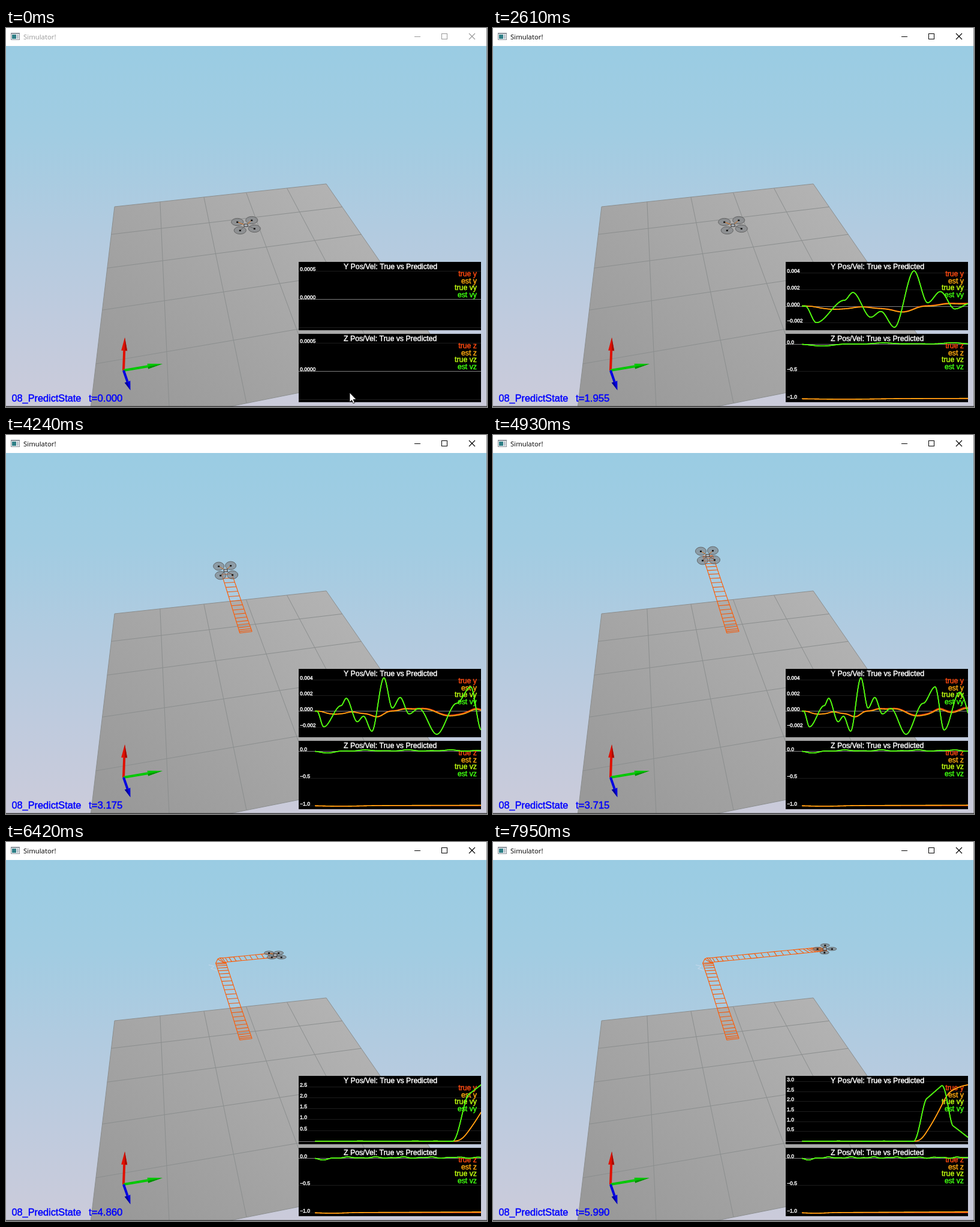
These frames come from a looping animation (802x632 px, 8 s). An HTML page with a canvas:

```html
<!DOCTYPE html>
<html lang="en">
<head>
<meta charset="utf-8">
<title>Simulator</title>
<style>
  html, body { margin: 0; width: 100%; height: 100%; overflow: hidden; background: #fff; }
  canvas { display: block; }
</style>
</head>
<body>
<canvas id="stage" width="802" height="632"></canvas>
<script>
const ctx = document.getElementById('stage').getContext('2d');
const LOOP = 8000, DT = 0.005, T_END = 6;

// ---- helpers ----
const linearEase = f => f;
const cubicEase = f => f * f * (3 - 2 * f);
const mix = (a, b, f) => a + (b - a) * f;
const mixAll = (a, b, f) => a.map((v, i) => mix(v, b[i], f));
const bump = (t, mid, width) => Math.exp(-(((t - mid) / width) ** 2));
const smooth = (from, to, t) => cubicEase(Math.min(1, Math.max(0, (t - from) / (to - from))));

function interpolate(keys, x, ease) {
  let i = 1;
  while (i < keys.length - 1 && keys[i][0] < x) i++;
  const [x0, v0] = keys[i - 1], [x1, v1] = keys[i];
  return mix(v0, v1, ease(Math.min(1, Math.max(0, (x - x0) / (x1 - x0)))));
}

function line(color, width, ...pts) {
  ctx.strokeStyle = color;
  ctx.lineWidth = width;
  ctx.beginPath();
  pts.forEach(p => ctx.lineTo(p[0], p[1]));
  ctx.stroke();
}

function shape(fill, ...pts) {
  ctx.fillStyle = fill;
  ctx.beginPath();
  pts.forEach(p => ctx.lineTo(p[0], p[1]));
  ctx.fill();
}

function rect(fill, x, y, w, h) {
  ctx.fillStyle = fill;
  ctx.fillRect(x, y, w, h);
}

// Plotter-style lettering, slightly thickened
function label(str, x, y, size, color, align = 'left') {
  ctx.font = `${size}px "Liberation Sans", Arial, sans-serif`;
  ctx.fillStyle = ctx.strokeStyle = color;
  ctx.lineWidth = .45;
  ctx.textAlign = align;
  ctx.fillText(str, x, y);
  ctx.strokeText(str, x, y);
}

function linear(x0, y0, x1, y1, ...colors) {
  const g = ctx.createLinearGradient(x0, y0, x1, y1);
  colors.forEach((c, i) => g.addColorStop(i / (colors.length - 1), c));
  return g;
}

// ---- signals ----
// Turning points of the hover drift, in mm/s
const drift = [[.04, 0], [.17, -2], [.5, .7], [.6, 1.64], [.81, -1.35], [.93, -.65], [1.09, -2.56],
  [1.32, 4.25], [1.48, .4], [1.63, 1.75], [1.8, -.35], [1.99, .35], [2.33, -2.95], [2.71, 1],
  [2.98, 3.1], [3.18, -2.4]];

function velY(t) {
  const hover = t < 3.18 ? interpolate(drift, t, cubicEase)
    : -2.4 * Math.cos(9 * (t - 3.18)) - 6 * bump(t, 4.01, .05);
  const cruise = smooth(4.03, 4.5, t) * (2.2 + 1.2 * (t - 4.55));
  const settle = .18 + 1.07 * (6 - t);
  return hover / 1000 + mix(cruise, settle, smooth(5.03, 5.45, t));
}
const velZ = t => -.04 * bump(t, .24, .18)
  + (1 - Math.exp(-3 * t * t)) * (.007 + .008 * Math.sin(8 * t) + .005 * Math.sin(15 * t));
const posZ = t => -1 - .012 * bump(t, .5, .5);

const sample = fn => Array.from({ length: T_END / DT + 1 }, (_, i) => fn(i * DT));
let travelled = 0;
const velYData = sample(velY), velZData = sample(velZ), posZData = sample(posZ);
const posYData = velYData.map(v => travelled += v * DT);
const posY = t => posYData[Math.round(t / DT)];

const RED = '#ff4a10', ORANGE = '#ffaa10', LIME = '#c0ff10', GREEN = '#40ff10';
const colors = [RED, ORANGE, LIME, GREEN];
const plots = [
  { axis: 'y', top: 390, title: 'Y Pos/Vel: True vs Predicted',
    series: [posYData.map((v, i) => v + 4e-5 * i * DT), posYData, velYData, velYData] },
  { axis: 'z', top: 510, title: 'Z Pos/Vel: True vs Predicted',
    series: [posZData, posZData.map((v, i) => v + .003 * Math.max(0, i * DT - 1)), velZData, velZData] }
];

function drawPlot({ axis, top, title, series }, t) {
  const left = 488, right = 792, bottom = top + 114, x0 = 515;
  const shown = series.map(data => data.slice(0, Math.round(t / DT) + 1));
  let lo = -.0005, hi = .0005;
  if (t > 0) {
    lo = Math.min(...shown.flat());
    hi = Math.max(...shown.flat(), lo + 1e-5);
  }
  const unit = 94 / (hi - lo);
  const toY = v => top + 109 - (v - lo) * unit;

  ctx.save();
  ctx.beginPath();
  ctx.rect(left, top, right - left, 114);
  ctx.clip();
  rect('#000', left, top, right - left, 114);

  const decade = 10 ** Math.floor(Math.log10(hi - lo) + 1e-9);
  const lead = (hi - lo) / decade;
  const step = decade * (lead < 3 ? .5 : lead < 6 ? 1 : 2);
  const digits = Math.max(0, -Math.floor(Math.log10(step) + 1e-9));
  const ticks = [];
  for (let i = Math.ceil((lo - 5 / unit) / step); i * step < hi + 15 / unit; i++) ticks.push(i);
  for (const i of ticks) {
    const y = Math.round(toY(i * step)) + .5;
    line(i ? '#1c1c1c' : '#808080', 1, [left, y], [right, y]);
  }

  ['true ', 'est ', 'true v', 'est v'].forEach((name, i) =>
    label(name + axis, 785, top + 24 + i * 11.7, 12.3, colors[i], 'right'));

  if (t > 0) {
    ctx.lineJoin = 'round';
    shown.forEach((data, s) =>
      line(colors[s], 1.6, ...data.map((v, i) => [x0 + (right - x0) * i * DT / t, toY(v)])));
  }
  for (const i of ticks) {
    const y = toY(i * step);
    if (y < bottom - 5.9 && y > top + 4)
      label((i * step).toFixed(digits).replace('-', '−'), 490, y, 8.6, '#fff');
  }
  label(title, 563, top + 12, 12.3, '#fff');
  ctx.restore();
}

// ---- scene ----
function floorPoint(u, v) {
  const w = 1 + .0191 * u - .0897 * v;
  return [(80.8 * u - 21.22 * v + 181) / w, (-2.64 * u + 15.25 * v + 298) / w];
}

function drawFloor() {
  shape(linear(200, 630, 540, 260, '#999', '#b3b3b3'),
    floorPoint(0, 0), floorPoint(5, 0), floorPoint(5, 5), floorPoint(0, 5));
  for (let i = 0; i <= 5; i++) {
    line('#8b8e8e', 1, floorPoint(i, 0), floorPoint(i, 5));
    line('#8b8e8e', 1, floorPoint(0, i), floorPoint(5, i));
  }
}

function arrow(color, shade, x, y, head, half) {
  const ox = 196, oy = 571, len = Math.hypot(x - ox, y - oy);
  const dx = (x - ox) / len, dy = (y - oy) / len;
  const at = (along, side) => [ox + dx * along - dy * side, oy + dy * along + dx * side];
  line(color, 4, at(0, 0), at(len - head, 0));
  shape(color, at(len, 0), at(len - head, half), at(len - head, -half));
  shape(shade, at(len, 0), at(len - head, half), at(len - head, half * .2));
}

// Climb, then slide sideways with the lateral position
function dronePos(t) {
  const climb = smooth(2.1, 3.6, t), side = t < 4 ? 0 : posY(t);
  return [400 - 42 * climb + 69 * side, 329 - 128 * climb - 3.5 * smooth(4.03, 4.2, t) - 6.8 * side];
}

// Screen vectors of the drone's right and front axes, as [rx, ry, fx, fy]
const GROUND = [12, -1.5, 2.3, 7], HOVER = [10, -.5, 1.5, 7.7];
const CRUISE = [8, 0, 2.3, 3.5], BRAKED = [6.3, -3, 5.8, 3];
function dronePose(t) {
  let axes = mixAll(GROUND, HOVER, smooth(2.1, 3.2, t));
  axes = mixAll(axes, CRUISE, smooth(3.95, 4.3, t));
  const [rx, ry, fx, fy] = mixAll(axes, BRAKED, smooth(5, 5.4, t));
  const roll = .45 * bump(t, 4.2, .12), c = Math.cos(roll), s = Math.sin(roll);
  return { right: [rx * c - ry * s, rx * s + ry * c], front: [fx, fy], roll };
}

function drawDrone(t) {
  const [x, y] = dronePos(t), { right, front, roll } = dronePose(t);
  for (const f of [-1, 1]) for (const r of [-1, 1]) {
    const cx = x + r * right[0] + f * front[0], cy = y + r * right[1] + f * front[1];
    ctx.beginPath();
    ctx.ellipse(cx, cy, 4 + Math.hypot(...right) / 2, front[1] * .88, roll, 0, 7);
    ctx.fillStyle = 'rgba(128,130,134,.65)';
    ctx.fill();
    ctx.strokeStyle = '#5c5c5c';
    ctx.lineWidth = .9;
    ctx.stroke();
    line(f < 0 ? '#d8701c' : '#666', 1, [x, y], [cx, cy]);
    rect('#111', cx - 1.5, cy - 1, 3, 2.5);
  }
  rect('#333', x - 3.5, y - 2.5, 7, 5);
  rect('#b4bac2', x - 2.5, y - 1.5, 5, 3);
}

function drawTrail(t) {
  const a = [], b = [];
  let last = [0, 0];
  for (let s = 2.04; s < t; s += .06) {
    const [x, y] = dronePos(s), { right, front } = dronePose(s);
    if (Math.hypot(x - last[0], y - last[1]) < 1.8) continue;
    last = [x, y];
    const [hx, hy] = mixAll(right.map(v => v * .85), front, smooth(4.05, 4.3, s));
    a.push([x - hx, y - hy]);
    b.push([x + hx, y + hy]);
  }
  if (t > 3.9) line('rgba(215,225,240,.45)', 1.5, [338, 205], [347, 207], [342, 211], [351, 214]);
  a.forEach((p, i) => line('#f25a0c', 1.1, p, b[i]));
  line('#ff5a00', 1.1, ...a);
  line('#ff5a00', 1.1, ...b);
}

function drawWindow(active) {
  const ink = active ? '#000' : '#999';
  rect('#fff', 0, 0, 801, 30);
  rect('#8a9199', 8, 8, 15, 12);
  rect('#f4f6f8', 9, 10, 13, 9);
  rect('#2f7f86', 10, 11, 7, 7);
  rect('#b9c4cc', 18, 11, 3, 7);
  ctx.font = '11.4px "Open Sans", sans-serif';
  ctx.textAlign = 'left';
  ctx.fillStyle = ink;
  ctx.fillText('Simulator!', 29, 19);
  line(ink, 1, [681, 14.5], [691, 14.5]);
  ctx.strokeRect(726.5, 9.5, 9, 9);
  line(ink, 1.1, [772, 9], [782, 19]);
  line(ink, 1.1, [782, 9], [772, 19]);
  rect('#888', 801, 0, 1, 632);
  rect('#3a3a3a', 0, 630.5, 802, 1.5);
}

function drawCursor() {
  const pts = [[573, 608], [573, 624], [576.5, 620.5], [579, 626], [581.5, 625], [579, 619.5], [584, 619.5]];
  shape('#fff', ...pts);
  line('#000', .8, ...pts, pts[0]);
}

// Rendered step -> simulated seconds
const clock = [[-1, 0], [0, .04], [54, 3.175], [82, 4.86], [102, 5.99]];

function draw(ms) {
  const step = ms < 65 ? -1 : Math.floor((ms - 58) / 77.2);
  const t = Math.floor(interpolate(clock, step, linearEase) / DT + .3) * DT;
  rect(linear(0, 30, 0, 630, '#9acce3', '#a1cce2', '#b1cbe0', '#bfcbde', '#cbcbda'), 0, 30, 802, 602);
  drawFloor();
  drawTrail(t);
  drawDrone(t);
  arrow('#e01000', '#a80c00', 198, 516, 22, 5);
  arrow('#00c800', '#009000', 261, 560, 25, 4.5);
  arrow('#0000e0', '#000098', 207.5, 604, 15, 5);
  label('08_PredictState', 9.5, 623, 16.3, '#00f');
  label('t=' + t.toFixed(3), 138, 623, 16.8, '#00f');
  plots.forEach(p => drawPlot(p, t));
  drawWindow(step >= 0);
  if (step < 0) drawCursor();
}

const start = performance.now();
function tick() {
  draw((performance.now() - start) % LOOP);
  requestAnimationFrame(tick);
}
tick();
</script>
</body>
</html>
```
